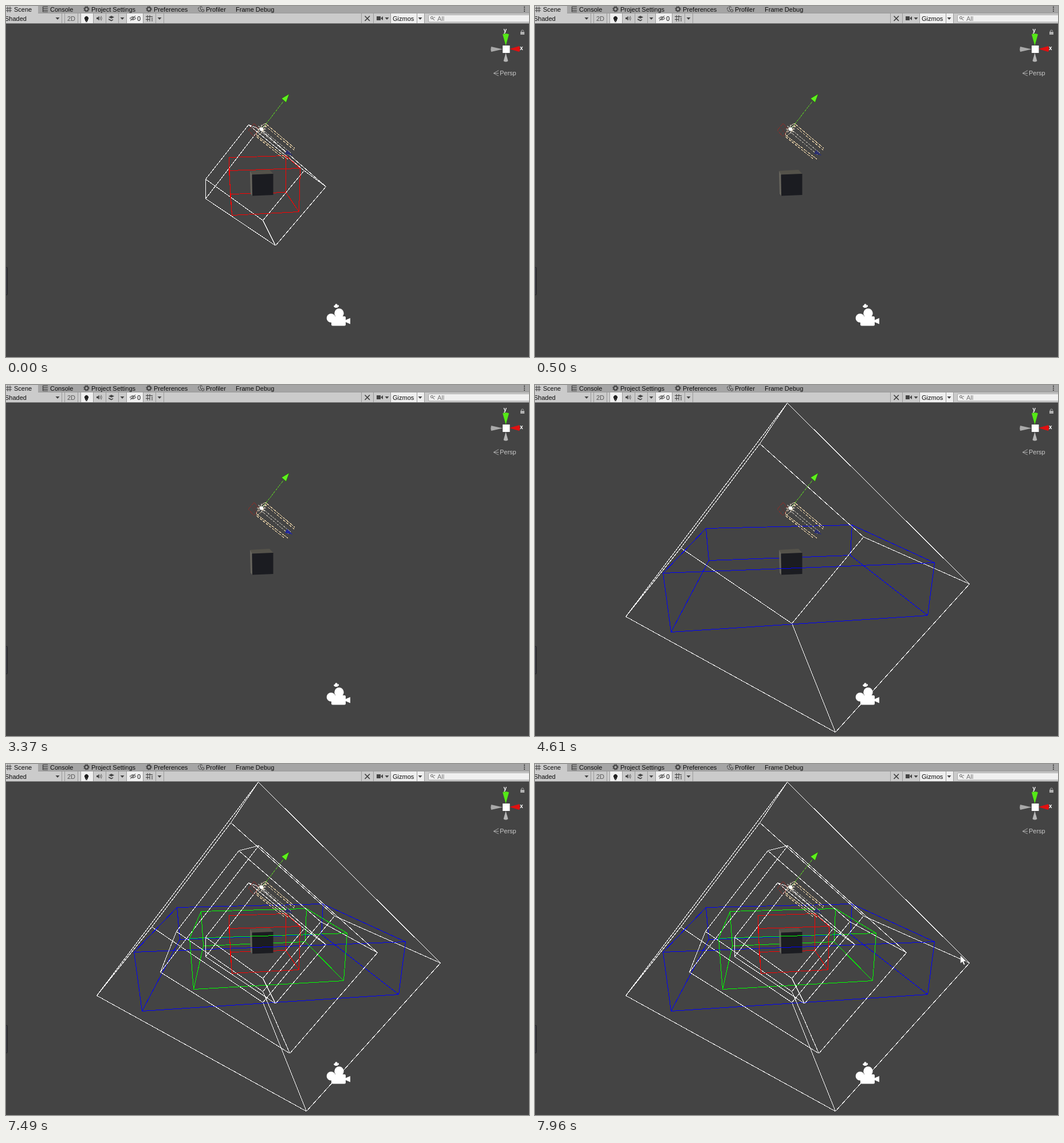
Recreate the animation shown at these times as an HTML page. Size 913 by 613 pixels, loop 8 s.

```html
<!DOCTYPE html>
<html lang="en">
<head>
<meta charset="utf-8">
<title>Scene view boxes</title>
<style>
html, body { margin: 0; width: 100%; height: 100%; overflow: hidden; background: #444; }
svg { display: block; width: 913px; height: 613px; }
text { font: 11px "Liberation Sans", Arial, sans-serif; fill: #0c0c0c; white-space: pre; }
.wire path { fill: none; stroke-width: 1; shape-rendering: crispEdges; }
.crisp { shape-rendering: crispEdges; }
.line { fill: none; stroke: #3c3c3c; }
</style>
</head>
<body>
<svg viewBox="0 0 913 613">
  <rect width="913" height="613" fill="#444"/>

  <g id="behind" class="wire" transform="translate(.5 .5)"></g>

  <!-- object and side handle -->
  <g>
    <path d="M426 288L460 286 466.500 293 429.500 294.500Z" fill="#54524a"/>
    <path d="M426 288L429.500 294 430 331.500 427 328Z" fill="#68665e"/>
    <path d="M429.500 294.500L466.500 293 466.500 330 430 331.500Z" fill="#1b1c21"/>
    <rect x="-2.500" y="456.500" width="5" height="48" rx="1" fill="#3a3b42" stroke="#222"/>
  </g>

  <g id="front" class="wire" transform="translate(.5 .5)"></g>

  <!-- light and its move handle -->
  <g class="crisp" fill="none">
    <path d="M433 205L423 217 433 228 442 216Z" stroke="#84302c" stroke-dasharray="3 1"/>
    <path d="M428 211L437 222M430 222L437 211" stroke="#633230" stroke-dasharray="2 1"/>
    <ellipse cx="445.500" cy="216" rx="3.500" ry="13" transform="rotate(36 445.500 216)" stroke="#d9c8a6" stroke-dasharray="4 1"/>
    <g stroke="#f6dcae">
      <path d="M453.500 205.500L504 248.500M437.500 225.500L492 267.500" stroke-dasharray="7 1"/>
      <path d="M451.500 208.500L503 251.500M437.500 228.500L487.500 268.500" stroke-dasharray="5 2"/>
    </g>
    <path d="M449.500 217.500L497 256.500M446.500 220.500L493 259.500" stroke="#b5b1a8" stroke-dasharray="4 1"/>
    <path d="M453.500 206.500L483.500 167.500" stroke="#58b52a" stroke-dasharray="6 1"/>
    <path d="M446.500 214.500L454.500 205.500" stroke="#8fc86a"/>
    <path d="M494.500 153.500L481 161.500 489 168.500Z" fill="#5ef01d" stroke="#1d4d0b" stroke-width=".6" shape-rendering="auto"/>
    <path id="zTip" d="M487 258L491 251 500 261Z"/>
  </g>
  <g id="sun" stroke="#e6e1d5" stroke-width="1.200">
    <circle cx="446" cy="215" r="3.200" fill="#fff" stroke="none"/>
  </g>

  <!-- camera icon -->
  <g fill="#fff">
    <circle cx="567.500" cy="545" r="7.800"/>
    <circle cx="581.500" cy="536.500" r="8.200"/>
    <rect x="568" y="542" width="25" height="16.500" rx="2"/>
    <path d="M592 549L595 547.500 601 545V555.500L595 553 592 551.500Z"/>
    <circle cx="574" cy="524.500" r="1.800"/>
    <circle cx="576.500" cy="522.500" r="2.200"/>
    <path d="M574 523H579L581 522V526L579 525V527H574Z"/>
  </g>

  <!-- orientation gizmo -->
  <g>
    <path d="M847 71Q845.500 75.500 847 80L867 75.500Z" fill="#a9a9a9"/>
    <path d="M868.500 96Q872.500 99 876.500 96L872.500 82Z" fill="#b5b5b5"/>
    <path d="M867 49.500Q872.500 47 878 49.500L872.500 69Z" fill="#55e816"/>
    <path d="M896 70Q898.500 75 896 80L879 75Z" fill="#e01010"/>
    <rect x="867" y="69" width="12.500" height="13" fill="#fff"/>
    <text x="868.500" y="46" style="fill:#fff;font-weight:bold;font-size:10px">y</text>
    <text x="897" y="77" style="fill:#fff;font-weight:bold;font-size:10px">x</text>
    <rect x="898" y="45" width="7" height="5" fill="#b0b0b0"/>
    <path d="M899.500 45V44a2 2 0 0 1 4 0" fill="none" stroke="#b0b0b0"/>
    <path d="M860 112.500L851 117.500 860 122M851 117.500H860" fill="none" stroke="#aaa"/>
    <text x="862" y="121" style="fill:#c8c8c8">Persp</text>
  </g>

  <!-- tabs and toolbar -->
  <g>
    <g class="crisp">
      <rect width="913" height="13" fill="#a5a5a5"/>
      <rect width="56" height="13" fill="#cbcbcb"/>
      <rect y="13" width="913" height="17" fill="#cbcbcb"/>
      <rect y="12" x="56" width="857" height="1" fill="#999"/>
      <rect y="30" width="913" height="1" fill="#808080"/>
      <path d="M131 13h21v17h-21zM211 13h28v17h-28zM672 13h58v17h-58z" fill="#efefef"/>
      <path id="splits" stroke="#9a9a9a"/>
    </g>
    <rect x="737.500" y="15.500" width="180" height="12.500" rx="2" fill="#f0f0f0" stroke="#aaa"/>
    <g id="labels"></g>
    <path id="arrows" fill="#444"/>
    <g class="line">
      <path d="M3 1V11M7 1V11M0 4H10M0 8H10"/>
      <path d="M65 1.500H73M65 4.500H73M65 7.500H73M65 10H73M64.500 1V10.500" stroke-width="1.200"/>
      <g id="gears"></g>
      <path d="M340 9.500A4.200 4.200 0 1 1 343.500 3.500M339.500 2.500V6L341.500 7" stroke-dasharray="5 1"/>
      <circle cx="343.500" cy="8" r="2.200"/>
      <path d="M216 21.500Q221.500 16 227 21.500 221.500 27 216 21.500M217 26L226 17"/>
      <circle cx="221.500" cy="21.500" r="1.800"/>
      <path d="M247 16V27M251 16V27M244 18.500H256M244 23.500H251M255 20V27"/>
      <path d="M164 19Q165.500 21.500 164 24M166 17.500Q168.500 21.500 166 25.500" stroke="#555"/>
      <path d="M626.500 17.500L635 26M635 17.500L626.500 26" stroke-width="1.600"/>
      <circle cx="743.500" cy="20.500" r="2" stroke="#555"/>
      <path d="M745 22L748 25M747 20H749" stroke="#555"/>
    </g>
    <g fill="#444">
      <path d="M138 24a3.500 3.500 0 1 1 5 0V26H138ZM139 26.500H142V28H139Z" fill="#222"/>
      <path d="M158 20H160L162.500 17.500V25.500L160 23H158Z"/>
      <path d="M179 19.500L184 17 189 19.500 184 22ZM179 22L184 24.500 187 23V24.500L184 26.500 179 24Z"/>
      <path d="M647 18H654V25H647ZM654.500 21L658 18V25L654.500 22Z"/>
      <path d="M904 1H906V3H904ZM904 4.500H906V6.500H904ZM904 8H906V10H904Z"/>
    </g>
  </g>

  <path id="cursor" d="M0 0V14.500L3.500 11.500 6 17 8.300 16 6 10.700H10.700Z" fill="#fff" stroke="#222" stroke-width=".5"/>
</svg>
<script>
const LOOP = 8000;
const $ = id => document.getElementById(id);
const make = (tag, parent, attrs) => {
  const el = document.createElementNS("http://www.w3.org/2000/svg", tag);
  for (const key in attrs) el.setAttribute(key, attrs[key]);
  return parent.appendChild(el);
};

// Each box has eight corners; an edge joins corners differing in one index bit.
// Bit 0 is depth, so edges with it clear at both ends form the far side.
const boxEdges = corners => {
  const pts = corners.split(" ");
  const edges = { far: "", near: "" };
  for (let i = 0; i < 8; i++)
    for (const bit of [1, 2, 4])
      if (!(i & bit)) edges[(i | bit) & 1 ? "near" : "far"] += `M${pts[i]}L${pts[i | bit]}`;
  return edges;
};

const boxes = [
  { color: "#00f", spans: [[4610, LOOP]],
    frustum: "392,102 440,31 254,284 158,404 573,265 758,347 448,416 524,606",
    slice: "298,250 223,328 303,306 237,431 553,244 697,310 550,297 685,402" },
  { color: "#0f0", spans: [[2140, 3370], [6020, LOOP]],
    frustum: "406,151 441,142 297,292 269,363 549,275 648,329 448,397 495,505",
    slice: "340,257 320,304 344,317 327,393 524,252 595,295 522,310 589,378" },
  { color: "#f00", spans: [[0, 500], [7490, LOOP]],
    frustum: "423,207 442,214 348,302 348,336 520,287 558,315 448,374 470,418",
    slice: "389,264 389,287 391,328 394,365 488,261 513,283 488,325 511,359" }
];
for (const box of boxes) {
  const frustum = boxEdges(box.frustum), slice = boxEdges(box.slice);
  box.parts = [
    make("path", $("behind"), { d: slice.far, stroke: box.color }),
    make("path", $("front"), { d: frustum.far + frustum.near, stroke: "#fff" }),
    make("path", $("front"), { d: slice.near, stroke: box.color })
  ];
}

const labels = [
  [14, 10, "Scene"], [77, 10, "Console"], [149, 10, "Project Settings"],
  [258, 10, "Preferences"], [349, 10, "Profiler"], [401, 10, "Frame Debug"],
  [-2, 26, "Shaded"], [107, 26, "2D", "#555"], [229, 26, "0"],
  [675, 26, "Gizmos"], [753, 26, "All", "#777"]
];
for (const [x, y, label, fill = "#0c0c0c"] of labels)
  make("text", $("labels"), { x, y, style: `fill:${fill}` }).textContent = label;

for (const cx of [140.5, 249.5]) {
  make("circle", $("gears"), { cx, cy: 5.5, r: 3.2, "stroke-width": 2 });
  make("circle", $("gears"), { cx, cy: 5.5, r: 4.8, "stroke-dasharray": "1.8 2" });
}

$("splits").setAttribute("d", [97, 102, 125, 130, 152, 174, 196, 210, 239, 261, 275, 620, 641, 671, 717, 730]
  .map(x => `M${x}.5 13V30`).join(""));
$("arrows").setAttribute("d", [90, 203, 268, 665, 723]
  .map(x => `M${x - 3.5} 20H${x + 3.5}L${x} 24Z`).join(""));

for (let i = 0; i < 8; i++) {
  const a = i * Math.PI / 4, c = Math.cos(a), s = Math.sin(a);
  make("path", $("sun"), { d: `M${446 + 4.5 * c} ${215 + 4.5 * s}L${446 + 7.5 * c} ${215 + 7.5 * s}` });
}

const cursorSteps = [[7720, 890, 294], [7800, 838, 310], [7880, 780, 326], [7960, 742.5, 334]];
const start = performance.now();

function draw() {
  const t = (performance.now() - start) % LOOP;
  for (const { parts, spans } of boxes) {
    const shown = spans.some(([from, to]) => t >= from && t < to);
    for (const part of parts) part.style.display = shown ? "" : "none";
  }

  $("zTip").setAttribute("fill", t >= 2140 && t < 4610 ? "#23299c" : "#2c3070");

  const step = cursorSteps.filter(([at]) => t >= at).pop();
  $("cursor").style.display = step ? "" : "none";
  if (step) $("cursor").setAttribute("transform", `translate(${step[1]} ${step[2]})`);
  requestAnimationFrame(draw);
}
draw();
</script>
</body>
</html>
```
